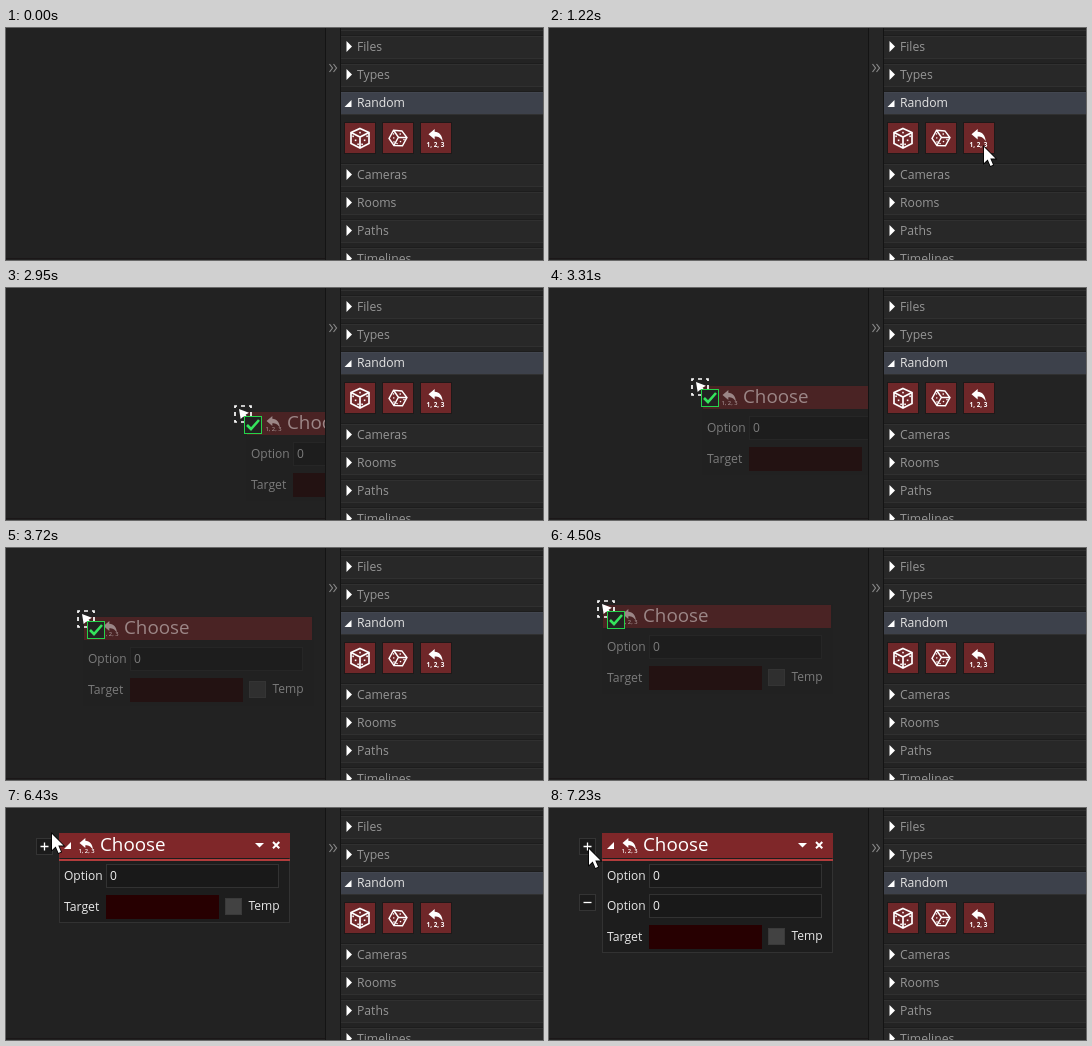
Recreate the animation shown at these times as an HTML page with a canvas. Size 537 px wide and 232 px high, loop 8000 ms.

```html
<!DOCTYPE html>
<html lang="en">
<head>
<meta charset="utf-8">
<title>Drag an action</title>
<style>
  html, body { margin: 0; width: 100%; height: 100%; overflow: hidden; background: #222; }
  canvas { display: block; }
</style>
</head>
<body>
<canvas id="stage" width="537" height="232"></canvas>
<script>
const LOOP = 8000, PRESS = 1550, DRAG = 1980, DROP = 5760, ADD = 7160;
const ctx = document.getElementById('stage').getContext('2d');

const REPLY = 'M0 5.5 6.5 0V3C11.5 3.2 14.5 7 15 13C12.5 9.3 10.5 8 6.5 8V11Z';
const ARROW = 'M0 0V16L3.7 12.6 6.5 19 9 17.8 6.3 11.6H11.5Z';
const SMALL_ARROW = 'M0 0 1.5 9 4 6.8 7.5 11 9.3 9.2 6 5.3 9 3.5Z';
const CORNER = 'M0 7H7V0Z';
const CROSS = 'M0 0 7 7M7 0 0 7';

const linear = u => u;
const smooth = u => (1 - Math.cos(Math.PI * u)) / 2;
const easeOut = power => u => 1 - (1 - u) ** power;

// 0 before start, 1 after end
function progress(t, start, end, ease) {
  return ease(Math.min(1, Math.max(0, (t - start) / (end - start))));
}

function enteringPointer(t) {
  const p = progress(t, 500, 1370, easeOut(1.8));
  return [526 - 95 * p, 222 - 107 * p].map(Math.round);
}

function droppedPointer(t) {
  const p = progress(t, 6360, 6580, smooth);
  return [48 - 8 * p, 21 + 20 * p].map(Math.round);
}

function dragPosition(t) {
  const lift = progress(t, DRAG, 2270, linear);
  const cross = progress(t, 2270, 3720, easeOut(1.26));
  const settle = progress(t, 3720, 4230, smooth);
  const climb = progress(t, 2400, 4100, smooth);
  const rise = progress(t, 4700, 5200, smooth);
  return [
    425 - 5 * lift - 349 * cross - 23 * settle - rise,
    111 + 26 * lift - 85 * climb - 33 * rise
  ].map(Math.round);
}

function rect(x, y, w, h, fill, stroke) {
  ctx.fillStyle = fill;
  ctx.fillRect(x, y, w, h);
  if (stroke) {
    ctx.strokeStyle = stroke;
    ctx.lineWidth = 1;
    ctx.strokeRect(x + .5, y + .5, w - 1, h - 1);
  }
}

function text(str, x, y, size, color, weight = 400) {
  ctx.font = `${weight} ${size}px "Open Sans", sans-serif`;
  ctx.fillStyle = color;
  ctx.fillText(str, x, y);
}

function shape(d, x, y, { scale = 1, fill, stroke, width = 1 }) {
  const path = new Path2D(d);
  ctx.save();
  ctx.translate(x, y);
  ctx.scale(scale, scale);
  if (stroke) {
    ctx.strokeStyle = stroke;
    ctx.lineWidth = width;
    ctx.stroke(path);
  }
  if (fill) {
    ctx.fillStyle = fill;
    ctx.fill(path);
  }
  ctx.restore();
}

function die(x, y, angle, scale) {
  ctx.save();
  ctx.translate(x, y);
  ctx.rotate(angle);
  ctx.scale(scale, scale);
  shape('M0-9.5 9-5.5V5.5L0 10-9 5.5V-5.5ZM-9-5.5 0-1 9-5.5M0-1V10', 0, 0, { stroke: '#fff', width: 1.7 });
  ctx.fillStyle = '#fff';
  ctx.fillRect(-.8, -6.2, 1.6, 1.6);
  for (const i of [-1, 0, 1]) {
    ctx.fillRect(-5.2 + 2.5 * i, 1.5 + 4 * i, 1.6, 1.6);
    ctx.fillRect(3.8 + 2.5 * i, 1.5 - 4 * i, 1.6, 1.6);
  }
  ctx.restore();
}

function tile(x, hover) {
  rect(x, 94, 32, 32, '#1e1919');
  rect(x + 1, 95, 30, 30, hover ? '#8b3235' : '#6f2729');
}

function sidebar(hover) {
  rect(319, 0, 218, 232, '#232323');
  rect(319, 0, 1, 232, '#141414');
  rect(320, 0, 14, 232, '#262626');
  rect(334, 0, 1, 232, '#141414');
  shape('M0 0 3 4 0 8M4 0 7 4 4 8', 323.5, 36, { stroke: '#888', width: 1.2 });
  rect(335, 2, 202, 1, '#303030');

  ['Files', 'Types', 'Random', 'Cameras', 'Rooms', 'Paths', 'Timelines'].forEach((name, i) => {
    const open = name === 'Random';
    const y = 19 + 28 * i + (i > 2 ? 44 : 0);
    rect(335, y - 12, 202, 1, '#1d1d1d');
    rect(335, y - 11, 202, 22, open ? '#3d414b' : '#282828');
    rect(335, y - 11, 202, 1, open ? '#434751' : '#303030');
    rect(335, y + 11, 202, 1, '#303030');
    if (open) shape(CORNER, 338.5, y - 3, { fill: '#fff' });
    else shape('M0 0 5.5 5.5 0 11Z', 340.5, y - 6, { fill: '#fff' });
    text(name, 351, y + 4, 12.2, open ? '#e4e4e4' : '#969696');
  });

  tile(338);
  die(354, 110, 0, 1);
  tile(376);
  die(392, 110, .5, .85);
  tile(414, hover);
  shape(REPLY, 422.5, 101, { scale: .95, fill: '#fff' });
  text('1, 2, 3', 420.5, 118.5, 6.4, '#fff', 700);
}

function panel(x, y, options, ghost) {
  const row = i => 31 + 30 * i;
  ctx.save();
  ctx.translate(x, y);
  if (ghost) ctx.globalAlpha = .45;
  rect(0, 0, 231, 60 + 30 * options, ghost ? '#202020' : '#1d1d1d', ghost ? '#222' : '#323232');
  if (ghost) {
    rect(1, 1, 228, 23, '#7d2628');
  } else {
    rect(0, 0, 231, 25, '#7f2729');
    rect(0, 26, 231, 2, '#b23c3c');
    shape(CORNER, 5, 9, { fill: '#fff' });
    shape('M0 0H9L4.5 4.5Z', 196, 10, { fill: '#fff' });
    shape(CROSS, 214, 9, { scale: .9, stroke: '#fff', width: 2.2 });
  }
  shape(REPLY, 20.5, 5, { scale: .9, fill: '#fff' });
  text('1, 2, 3', 19.5, 20, 5.8, '#fff', 600);
  text('Choose', 41, 18, 18.8, '#fff');

  for (let i = 0; i < options; i++) {
    text('Option', 5, row(i) + 16, 12, '#e8e8e8');
    rect(47, row(i), 173, 24, '#191919', '#323232');
    text('0', 51, row(i) + 16, 12, '#f0f0f0');
  }
  const last = row(options) + 1;
  text('Target', 5, last + 16, 12.2, '#e8e8e8');
  rect(47, last, 113, 24, '#270001');
  rect(166, last + 3, 17, 17, '#424242', '#3a3a3a');
  text('Temp', 189.5, last + 15, 12, '#e8e8e8');
  ctx.restore();
}

function button(y, glyph, framed) {
  if (framed) rect(30, y - 8, 17, 17, '#1b1b1b', '#343434');
  shape(glyph, 38.5, y + .5, { stroke: '#fff', width: 1.3 });
}

function dragCursor(x, y, allowed) {
  ctx.setLineDash([4, 4]);
  ctx.lineDashOffset = 2;
  ctx.strokeStyle = '#fff';
  ctx.lineWidth = 1.7;
  ctx.strokeRect(x + 1, y + 1, 16, 16);
  ctx.setLineDash([]);
  shape(SMALL_ARROW, x + 5, y + 4, { scale: 1.1, fill: '#fff' });
  if (allowed) {
    rect(x + 10, y + 11, 18, 18, '#222', '#25d34a');
    shape('M0 5 4 9 12 0', x + 13, y + 15, { stroke: '#35e45c', width: 2.6 });
  } else {
    rect(x + 11, y + 11, 18, 18, 'rgba(30,12,12,.8)', '#160808');
    shape(CROSS, x + 14, y + 14, { scale: 1.6, stroke: '#e01818', width: 1.5 });
  }
}

function carriedTile(x, y) {
  rect(x + 4, y + 4, 64, 64, '#2a1516');
  rect(x + 5, y + 5, 62, 62, '#6f2729');
  shape(REPLY, x + 20, y + 12, { scale: 2.1, fill: '#fff' });
  text('1, 2, 3', x + 12.5, y + 58, 16, '#fff', 700);
}

function draw(t) {
  const dragging = t >= DRAG && t < DROP;
  const dropped = t >= DROP;
  const [x, y] = dragPosition(t);
  const overWorkspace = x < 319;

  rect(0, 0, 537, 232, '#222');
  rect(0, 230, 319, 1, '#1b1718');

  if (dragging && overWorkspace) {
    const [px, py] = dragPosition(t - 40);  // the panel trails the cursor
    panel(Math.max(53, px + 2), py + 4, 1, true);
  }
  if (dropped) {
    panel(53, 25, t < ADD ? 1 : 2);
    button(38, 'M-4 0H4M0-4V4', t >= 6430);
    if (t >= ADD) button(94, 'M-4 0H4', true);
  }

  sidebar(t >= 1230 && t < PRESS);

  if (dragging) {
    if (!overWorkspace) carriedTile(x, y);
    dragCursor(x, y, overWorkspace);
  } else if (t >= 500) {
    const tip = dropped ? droppedPointer(t) : enteringPointer(t);
    shape(ARROW, ...tip, { fill: '#fff', stroke: '#000', width: 1.6 });
  }
}

function frame() {
  draw(performance.now() % LOOP);
  requestAnimationFrame(frame);
}
frame();
</script>
</body>
</html>
```
